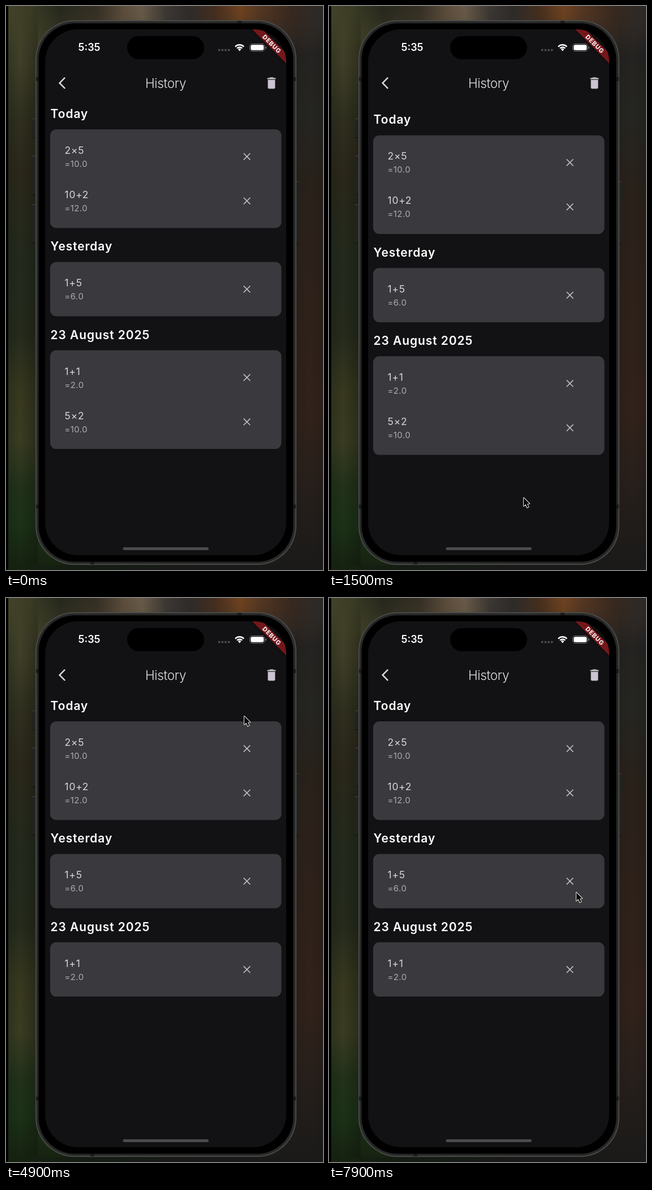
Write an HTML page with a canvas that moves like this. It is 560 by 992 pixels and loops after 8 s.

```html
<!DOCTYPE html>
<html lang="en">
<head>
<meta charset="utf-8">
<title>History</title>
<style>
  html, body { margin: 0; width: 100%; height: 100%; overflow: hidden; background: #000; }
  canvas { display: block; width: 100%; height: 100%; }
</style>
</head>
<body>
<canvas id="stage" width="560" height="992"></canvas>
<script>
const W = 560, H = 992, LOOP = 8000, STEP = 100, DELETE_AT = 2700;
const FONT = 'Inter, Roboto, sans-serif';
const stage = document.getElementById('stage').getContext('2d');
let g = stage;

const layer = () => {
  const c = document.createElement('canvas');
  c.width = W;
  c.height = H;
  return c;
};

function box(x, y, w, h, r, fill) {
  g.beginPath();
  g.roundRect(x, y, w, h, r);
  if (fill) {
    g.fillStyle = fill;
    g.fill();
  }
}

function line(points, color, width) {
  g.beginPath();
  points.forEach(([x, y]) => g.lineTo(x, y));
  g.strokeStyle = color;
  g.lineWidth = width;
  g.stroke();
}

function text(str, x, y, size, weight, color, spacing = 0, align = 'left') {
  g.font = `${weight} ${size}px ${FONT}`;
  g.letterSpacing = spacing + 'px';
  g.textAlign = align;
  g.fillStyle = color;
  g.fillText(str, x, y);
}

function gradient(x0, y0, x1, y1, stops) {
  const grad = g.createLinearGradient(x0, y0, x1, y1);
  stops.forEach(([at, color]) => grad.addColorStop(at, color));
  return grad;
}

function backdrop() {
  g.fillStyle = gradient(0, 0, 0, H, [
    [0, '#45452a'], [.1, '#403f28'], [.2, '#302f1f'], [.3, '#2b271a'],
    [.45, '#232a1d'], [.58, '#252a1c'], [.68, '#38381f'], [.77, '#3b3c22'],
    [.85, '#22321a'], [.92, '#1b3217'], [1, '#16210f']]);
  g.fillRect(0, 0, 280, H);
  g.fillStyle = gradient(0, 0, 0, H, [
    [0, '#302c28'], [.08, '#242321'], [.2, '#252521'], [.32, '#29211a'],
    [.5, '#2e211a'], [.72, '#32221a'], [.85, '#271f1b'], [1, '#1a1a19']]);
  g.fillRect(280, 0, 280, H);
  // darker toward the phone on the left, and toward the edge on the right
  g.fillStyle = gradient(4, 0, 56, 0, [[0, 'rgba(15,30,18,.28)'], [.4, 'rgba(15,20,10,0)'], [1, 'rgba(15,18,12,.4)']]);
  g.fillRect(0, 0, 56, H);
  g.fillStyle = gradient(512, 0, 560, 0, [[0, 'rgba(30,26,22,.3)'], [.5, 'rgba(30,26,22,0)'], [1, 'rgba(20,20,20,.25)']]);
  g.fillRect(512, 0, 48, H);

  const top = layer(), main = g;
  g = top.getContext('2d');
  g.fillStyle = gradient(0, 0, W, 0, [
    [0, '#43432a'], [.07, '#3c3c26'], [.17, '#26281c'], [.29, '#362f25'],
    [.37, '#5c4c3c'], [.43, '#695a4a'], [.5, '#3e3935'], [.58, '#2e2b29'],
    [.66, '#462e1e'], [.74, '#70431f'], [.8, '#553722'], [.9, '#38281e'], [1, '#2b2a29']]);
  g.fillRect(0, 0, W, 90);
  g.globalCompositeOperation = 'destination-in';
  g.fillStyle = gradient(0, 0, 0, 90, [[0, '#000'], [.25, 'rgba(0,0,0,.85)'], [1, 'rgba(0,0,0,0)']]);
  g.fillRect(0, 0, W, H);
  g = main;
  g.drawImage(top, 0, 0);

  g.fillStyle = gradient(0, 0, W, 0, [[0, '#16230f'], [.25, '#151b14'], [.6, '#181918'], [1, '#1b1a19']]);
  g.fillRect(0, 984, W, 8);
  g.fillStyle = '#000';
  g.fillRect(0, 0, 4, H);
}

function sideButton(x, y, w, h) {
  box(x, y, w, h, 1.5, '#222321');
  line([[x, y + .5], [x + w, y + .5]], '#45463f', 1);
  line([[x, y + h - .5], [x + w, y + h - .5]], '#111211', 1);
}

function shell() {
  sideButton(46, 198, 8, 34);
  sideButton(46, 263, 8, 69);
  sideButton(46, 349, 8, 68);
  sideButton(511, 308, 6, 110);
  box(52, 25, 461, 958, 69, '#4c4d4b');
  box(53.8, 26.8, 457.4, 954.4, 67, '#272827');
  for (const y of [125, 877]) {
    g.fillStyle = '#191a19';
    g.fillRect(53, y, 5, 7);
    g.fillRect(507, y, 5, 7);
  }
  g.fillRect(409, 26, 7, 5);
  g.fillRect(149, 977, 7, 5);
  box(57.5, 30.5, 450, 947, 64, '#000');
  box(69, 41, 426, 925, 58, '#121114');
}

function statusBar() {
  box(214, 53, 136, 40.5, 20.2, '#000');
  text('5:35', 147, 79.3, 18, 600, '#fff', 0, 'center');
  for (let i = 0; i < 4; i++) box(374.6 + i * 5.7, 75.6, 4, 4, 2, '#4c4b4e');

  g.strokeStyle = '#fff';
  g.lineWidth = 2.4;
  for (const r of [6.3, 10.5]) {
    g.beginPath();
    g.arc(412.6, 78.8, r, -Math.PI * .76, -Math.PI * .24);
    g.stroke();
  }
  g.beginPath();
  g.moveTo(412.6, 79.6);
  g.arc(412.6, 78.6, 3.8, -Math.PI * .76, -Math.PI * .24);
  g.fillStyle = '#fff';
  g.fill();

  box(430.5, 66.5, 26.5, 13, 4.2);
  g.strokeStyle = '#77767a';
  g.lineWidth = 1;
  g.stroke();
  box(432.3, 68.3, 23, 9.5, 2.7, '#fff');
  box(458.3, 71, 1.6, 4.4, .8, '#77767a');
}

function appBar() {
  g.lineJoin = 'miter';
  line([[104.2, 125.8], [94.6, 135.5], [104.2, 145.2]], '#d9d6dc', 2.5);
  text('History', 282, 144, 22.5, 300, '#e2e0e5', -.3, 'center');
  const c = '#cac4d0';
  g.fillStyle = c;
  g.fillRect(461.6, 126.6, 14.8, 2.1);
  g.fillRect(465.6, 125.5, 6.8, 2);
  box(462.6, 129.8, 12.8, 15.7, [0, 0, 2.2, 2.2], c);
}

function banner() {
  g.save();
  box(69, 41, 426, 925, 58);
  g.clip();
  g.translate(495, 41);
  g.rotate(Math.PI / 4);
  g.shadowColor = 'rgba(0,0,0,.5)';
  g.shadowBlur = 6;
  g.fillStyle = '#74171b';
  g.fillRect(-46, 29.7, 92, 12.8);
  g.shadowColor = 'transparent';
  text('DEBUG', .4, 40, 10.8, 800, '#f6eded', .8, 'center');
  g.restore();
}

function card(y, title, rows) {
  text(title, 78.6, y - 20, 21, 600, '#fff', .9);
  box(78, y, 408.5, 17.5 + rows.length * 78, 11, '#3a393d');
  rows.forEach(([sum, result], i) => {
    const top = y + i * 78;
    text(sum, 103.6, top + 43, 17.5, 400, '#d9d6db', .7);
    text('=' + result, 103.4, top + 66, 15, 400, '#aeabb0', .45);
    const x = 425.6, m = top + 47.8, r = 5.8;
    line([[x - r, m - r], [x + r, m + r]], '#c3bfc7', 1.6);
    line([[x + r, m - r], [x - r, m + r]], '#c3bfc7', 1.6);
  });
}

function list(t, shift) {
  const last = [['1+1', '2.0'], ['5×2', '10.0']];
  if (t >= DELETE_AT) last.pop();
  card(217 + shift, 'Today', [['2×5', '10.0'], ['10+2', '12.0']]);
  card(450.3 + shift, 'Yesterday', [['1+5', '6.0']]);
  card(605.6 + shift, '23 August 2025', last);
}

// Eased interpolation through [time, ...values] keys
function track(keys, t) {
  let i = 0;
  while (i < keys.length - 2 && t >= keys[i + 1][0]) i++;
  const [a, b] = [keys[i], keys[i + 1]];
  const p = Math.min(1, Math.max(0, (t - a[0]) / (b[0] - a[0])));
  const e = p * p * (3 - 2 * p);
  return a.slice(1).map((v, k) => v + (b[k + 1] - v) * e);
}

const POINTER = [
  [200, 301, 655], [1000, 308, 772], [1500, 344, 865], [2300, 429, 723],
  [3000, 429, 723], [4900, 421, 208], [5300, 421, 208], [6500, 464, 134],
  [7000, 464, 134], [7900, 437, 518]
];

function overscroll(t) {
  if (t < 1100) return track([[200, 0], [1000, 53.2], [1100, 53.2]], t)[0];
  if (t > 2000) return 0;
  return 53.2 * Math.exp(-(t - 1100) / 246.5);
}

function pointer(t) {
  if (t < 200) return;
  const [x, y] = track(POINTER, t);
  g.save();
  g.translate(x, y);
  g.beginPath();
  [[0, 0], [0, 14.6], [3.4, 11.5], [6, 17.3], [8.6, 16.2], [6.1, 10.6], [10.4, 10.4]]
    .forEach(([px, py]) => g.lineTo(px, py));
  g.closePath();
  g.lineJoin = 'round';
  g.strokeStyle = '#f4f4f4';
  g.lineWidth = 1.8;
  g.stroke();
  g.fillStyle = '#080808';
  g.fill();
  g.restore();
}

const base = layer();
g = base.getContext('2d');
backdrop();
shell();
statusBar();
appBar();
banner();
box(206.5, 952, 151.5, 5, 2.5, '#4b4a4d');
g = stage;

const start = performance.now();
function frame() {
  const now = Math.max(0, performance.now() - start) % LOOP;
  const t = Math.floor(now / STEP) * STEP;
  g.drawImage(base, 0, 0);
  list(t, overscroll(t));
  pointer(t);
  requestAnimationFrame(frame);
}
frame();
</script>
</body>
</html>
```
